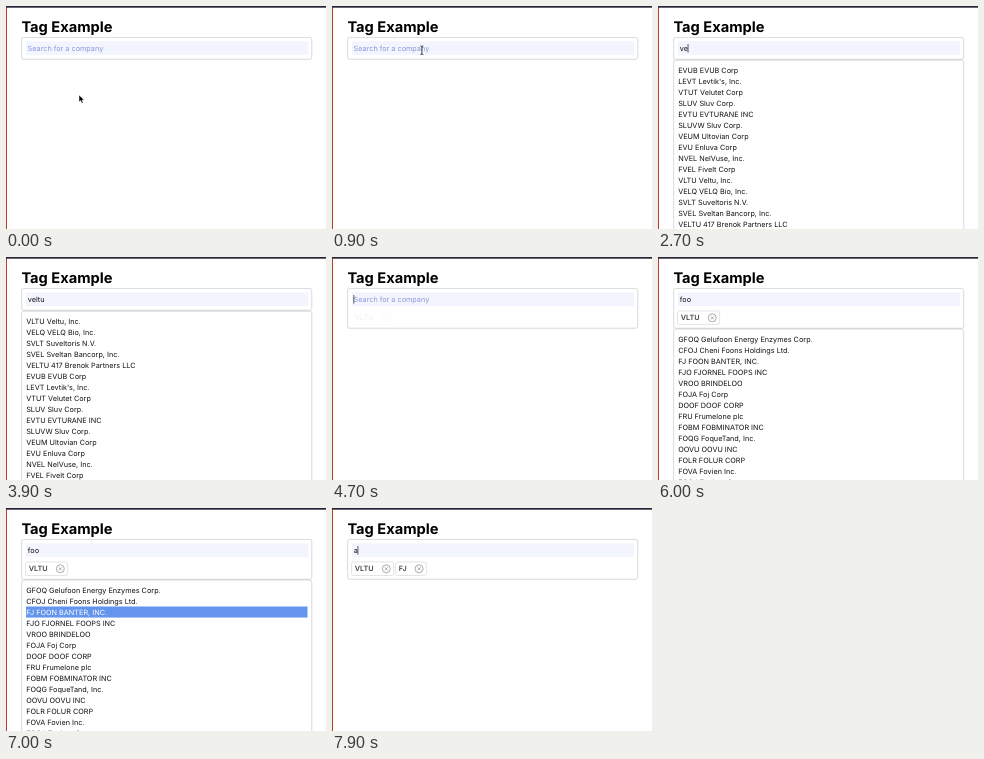
Animation, 320 px wide and 223 px high, one loop 8000 ms. Source, as an HTML page:

```html
<!DOCTYPE html>
<html lang="en">
<head>
<meta charset="utf-8">
<title>Tag Example</title>
<style>
html, body { margin: 0; width: 100%; height: 100%; overflow: hidden; background: #fff; }
svg { display: block; width: 320px; height: 223px; }
text { font: 7.27px Inter, sans-serif; fill: #111; text-rendering: geometricPrecision; white-space: pre; }
.title { font-size: 14.65px; font-weight: 700; fill: #000; }
.hint { fill: #8c96d9; }
.tag text { font-weight: 600; fill: #444; }
.tag rect { fill: #fff; stroke: #d9d9d9; stroke-width: .7; }
.tag path { fill: none; stroke: #777; stroke-width: .6; }
.panel { fill: #fff; stroke: #d6d8dc; stroke-width: .8; filter: drop-shadow(0 .5px .6px #0002); }
.on { fill: #fff; }
</style>
</head>
<body>
<svg id="stage" viewBox="0 0 320 223"></svg>
<script>
const LOOP = 8000, ROW = 11.05;
const stage = document.getElementById('stage');

const veltu = `VLTU Veltu, Inc.
VELQ VELQ Bio, Inc.
SVLT Suveltoris N.V.
SVEL Sveltan Bancorp, Inc.
VELTU 417 Brenok Partners LLC
EVUB EVUB Corp
LEVT Levtik's, Inc.
VTUT Velutet Corp
SLUV Sluv Corp.
EVTU EVTURANE INC
SLUVW Sluv Corp.
VEUM Ultovian Corp
EVU Enluva Corp
NVEL NelVuse, Inc.
FVEL Fivelt Corp`.split('\n');
const early = [...veltu.slice(5), ...veltu.slice(0, 5)];
const foo = `GFOQ Gelufoon Energy Enzymes Corp.
CFOJ Cheni Foons Holdings Ltd.
FJ FOON BANTER, INC.
FJO FJORNEL FOOPS INC
VROO BRINDELOO
FOJA Foj Corp
DOOF DOOF CORP
FRU Frumelone plc
FOBM FOBMINATOR INC
FOQG FoqueTand, Inc.
OOVU OOVU INC
FOLR FOLUR CORP
FOVA Fovien Inc.
FOOJ Foojent Corp`.split('\n');

// Each entry holds from its time until the next entry for the same key.
const typed = [[0, ''], [2100, 'v'], [2600, 've'], [3000, 'vel'], [3200, 'velt'], [3300, 'veltu'],
  [4700, ''], [5300, 'f'], [5400, 'fo'], [5500, 'foo'], [7100, ''], [7900, 'a']];
const caret = [[0, 0], [1600, 1], [3900, 0], [4500, 1], [6000, 0], [7100, 1]];
const lists = [[0, null], [2700, early], [3900, veltu], [4700, null], [6000, foo], [7100, null]];
const picked = [[0, -1], [4300, 0], [4700, -1], [6500, 0], [6700, 1], [6900, 2], [7100, -1]];
const at = (track, t) => track.findLast(([start]) => start <= t)[1];
const clamp = x => Math.max(0, Math.min(1, x));

const text = (x, y, s, cls = '') => `<text x="${x}" y="${y}" class="${cls}">${s}</text>`;
const rect = (x, y, w, h, attrs) => `<rect x="${x}" y="${y}" width="${w}" height="${h}" ${attrs}/>`;

function tag(x, width, label, start, t) {
  if (t < start) return '';
  const cx = x + width - 7.3;
  return `<g class="tag" opacity="${clamp(.05 + (t - start) / 310)}">` +
    rect(x, 54, width, 13.5, 'rx="1.8"') + text(x + 3.2, 63.3, label) +
    `<path d="M${cx - 4} 60.8a4 4 0 1 0 8 0a4 4 0 1 0-8 0M${cx - 1.5} 59.3l3 3m0-3l-3 3"/></g>`;
}

function list(rows, top, hot) {
  return rect(15.7, top, 290, 240, 'rx="2" class="panel"') + rows.map((row, i) => {
    const y = top + 4.3 + i * ROW, on = i === hot;
    return (on ? rect(20, y, 281.5, ROW, 'fill="#6495ed"') : '') +
      text(20.2, y + 8.15, row, on ? 'on' : '');
  }).join('');
}

function mouse(t) {
  if (t >= 2100) return '';
  const p = clamp((t - 300) / 800), e = p * p * (3 - 2 * p), q = clamp((t - 1200) / 200);
  const x = 73 + 20 * e + 2.3 * q, y = 89 - 53 * e + 5.5 * q;
  const [d, style] = y < 49
    ? ['M-1.5-4.3Q0-4.3 0-3.3Q0-4.3 1.5-4.3M0-3.5V3.5M-1.5 4.3Q0 4.3 0 3.3Q0 4.3 1.5 4.3', 'fill="none" stroke="#222" stroke-width=".8"']
    : ['M0 0V7l1.6-1.4 1.2 2.7 1.3-.6L3 5.1h2.2z', 'fill="#000" stroke="#fff" stroke-width=".5"'];
  return `<path transform="translate(${x} ${y})" d="${d}" ${style}/>`;
}

function draw(now) {
  const t = Math.floor(now % LOOP / 100) * 100;
  const value = at(typed, t), rows = at(lists, t), tagged = t >= 4700;
  stage.innerHTML =
    rect(0, 0, 1, 223, 'fill="#b23f28"') + rect(0, 0, 320, 1.7, 'fill="#282438"') +
    text(15.4, 25.5, 'Tag Example', 'title') +
    rect(15.7, 31.5, 290, tagged ? 39.7 : 21.7, 'rx="2" class="panel"') +
    rect(20, 35.3, 282, 13.7, 'fill="#f3f5fe"') +
    (value ? '' : text(21.6, 45, 'Search for a company', 'hint')) +
    `<text id="value" x="21.8" y="45">${value}</text>` +
    tag(19.6, 42, 'VLTU', 4700, t) + tag(63.6, 30.8, 'FJ', 7100, t) +
    (rows ? list(rows, tagged ? 72.1 : 54.2, at(picked, t)) : '') + mouse(t);
  if (at(caret, t)) {
    const x = 21.5 + document.getElementById('value').getComputedTextLength();
    stage.insertAdjacentHTML('beforeend', rect(x, 38, .7, 8.6, 'fill="#222"'));
  }
}

function loop() {
  draw(performance.now());
  requestAnimationFrame(loop);
}
loop();
</script>
</body>
</html>
```
